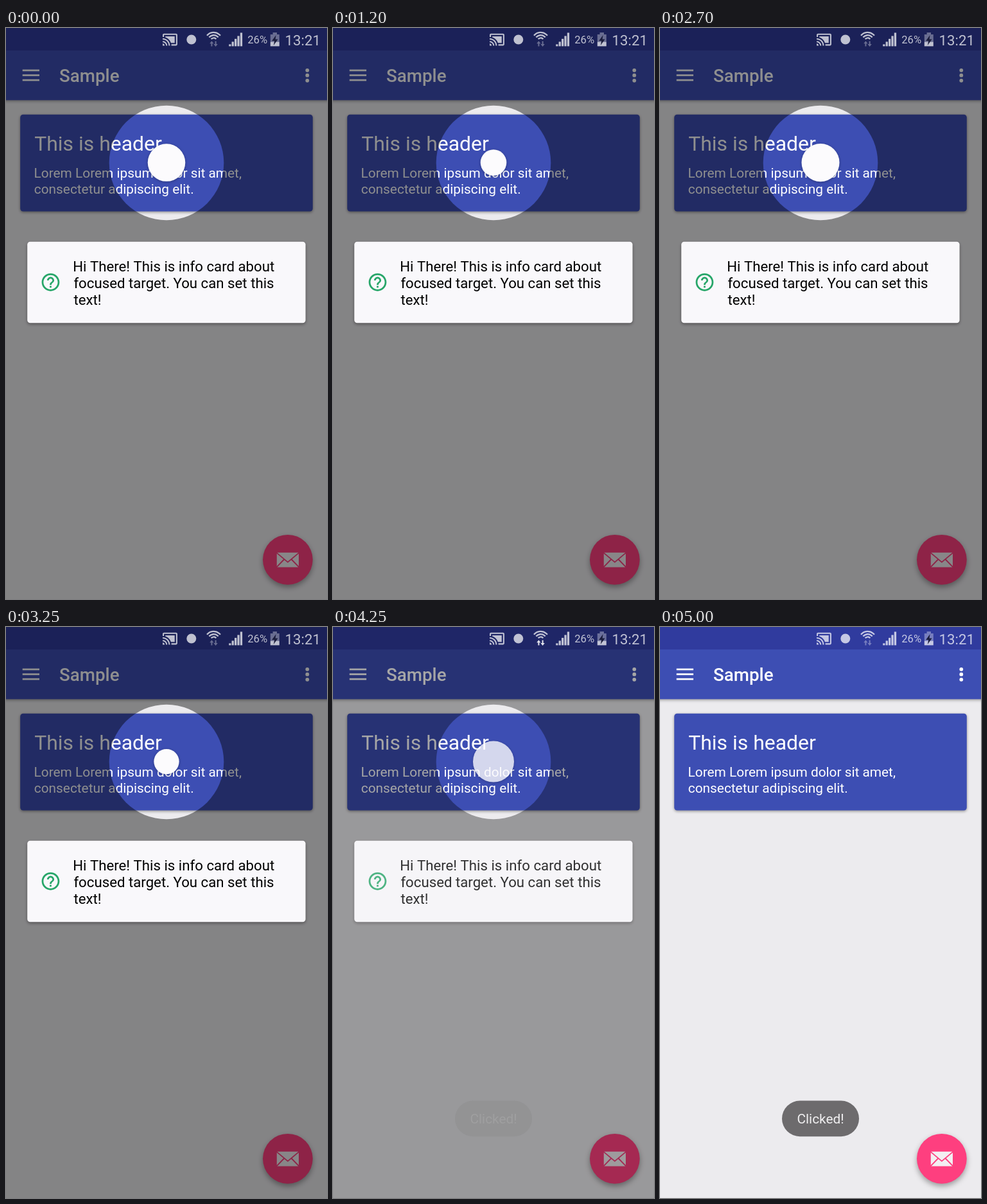
Animation, 500 px wide and 889 px high, one loop 5050 ms. Source, as an HTML page with a canvas:

```html
<!DOCTYPE html>
<html lang="en">
<head>
<meta charset="utf-8">
<title>Spotlight intro</title>
<style>
  html, body { margin: 0; width: 100%; height: 100%; overflow: hidden; background: #ecebee; }
  canvas { display: block; width: 500px; height: 889px; }
</style>
</head>
<body>
<canvas id="stage" width="500" height="889"></canvas>
<script>
const W = 500, H = 889, LOOP = 5050, STEP = 50, DP = 500 / 360;
const page = document.getElementById('stage').getContext('2d');
const layer = document.createElement('canvas');
layer.width = W;
layer.height = H;
const intro = layer.getContext('2d');

const ICON = 'rgba(255,255,255,.72)';
const DIM = 'rgba(255,255,255,.34)';
const BLUE = '#3d4eb3';
const PINK = '#fe3f7f';

const castIcon = new Path2D('M1 18v3h3c0-1.66-1.34-3-3-3zm0-4v2c2.76 0 5 2.24 5 5h2c0-3.87-3.13-7-7-7zm18-7H5v1.63c3.96 1.28 7.09 4.41 8.37 8.37H19V7zM1 10v2c4.97 0 9 4.03 9 9h2c0-6.08-4.93-11-11-11zm20-7H3c-1.1 0-2 .9-2 2v3h2V5h18v14h-7v2h7c1.1 0 2-.9 2-2V5c0-1.1-.9-2-2-2z');
const helpIcon = new Path2D('M11 18h2v-2h-2v2zm1-16C6.48 2 2 6.48 2 12s4.48 10 10 10 10-4.48 10-10S17.52 2 12 2zm0 18c-4.41 0-8-3.59-8-8s3.59-8 8-8 8 3.59 8 8-3.59 8-8 8zm0-14c-2.21 0-4 1.79-4 4h2c0-1.1.9-2 2-2s2 .9 2 2c0 2-3 1.75-3 5h2c0-2.25 3-2.5 3-5 0-2.21-1.79-4-4-4z');

// Pulse phase in degrees over time
const pulse = [[0, -55], [1200, 146], [2000, 299], [2700, 412], [3800, 625], [4250, 720], [5050, 864]];

const clamp = v => Math.min(1, Math.max(0, v));

function phaseAt(t) {
  const i = Math.max(1, pulse.findIndex(p => p[0] >= t));
  const [t0, a] = pulse[i - 1], [t1, b] = pulse[i];
  return a + (b - a) * (t - t0) / (t1 - t0);
}

function rect(c, x, y, w, h, fill) {
  c.fillStyle = fill;
  c.fillRect(x, y, w, h);
}

function rounded(c, x, y, w, h, r, fill) {
  c.beginPath();
  c.roundRect(x, y, w, h, r);
  c.fillStyle = fill;
  c.fill();
}

function disc(c, x, y, r, fill) {
  c.beginPath();
  c.arc(x, y, r, 0, Math.PI * 2);
  c.fillStyle = fill;
  c.fill();
}

function poly(c, points, fill) {
  c.beginPath();
  points.forEach(([x, y]) => c.lineTo(x, y));
  c.closePath();
  c.fillStyle = fill;
  c.fill();
}

function text(c, str, x, y, sp, fill, weight = 400) {
  c.font = `${weight} ${sp * DP}px Roboto, sans-serif`;
  c.fillStyle = fill;
  c.fillText(str, x, y);
}

function icon(c, path, x, y, scale, fill) {
  c.save();
  c.translate(x, y);
  c.scale(scale, scale);
  c.fillStyle = fill;
  c.fill(path);
  c.restore();
}

function shadowed(c, dy, blur, alpha, draw) {
  c.save();
  c.shadowColor = `rgba(0,0,0,${alpha})`;
  c.shadowBlur = blur;
  c.shadowOffsetY = dy;
  draw();
  c.restore();
}

function drawApp(c) {
  rect(c, 0, 0, W, H, '#ecebee');
  shadowed(c, 2, 5, .4, () => rect(c, -10, 30, W + 20, 82.3, BLUE));
  rect(c, 0, 0, W, 35, '#303b9e');

  for (const y of [64.6, 72.2, 79.8]) rect(c, 25.7, y, 26.3, 2.7, '#fff');
  for (const y of [65.8, 73.7, 81.8]) disc(c, 469.3, y, 2.9, '#fff');
  text(c, 'Sample', 83, 84, 20, '#fff', 500);

  shadowed(c, 1.5, 4, .4, () => rounded(c, 22.2, 134.8, 455.6, 150.8, 4.5, BLUE));
  text(c, 'This is header', 44.2, 191, 23, '#fff');
  text(c, 'Lorem Lorem ipsum dolor sit amet,', 43.6, 233.2, 15, '#fff');
  text(c, 'consectetur adipiscing elit.', 43.8, 257.8, 15, '#fff');

  drawMailButton(c);
}

function drawMailButton(c) {
  shadowed(c, 4, 8, .35, () => disc(c, 438.9, 827.8, 38.9, PINK));
  rounded(c, 421.8, 816.8, 34.2, 22.8, 1, '#f3eff2');
  c.strokeStyle = PINK;
  c.lineWidth = 1.8;
  c.beginPath();
  c.moveTo(421, 816.6);
  c.lineTo(438.9, 831.6);
  c.lineTo(456.8, 816.6);
  c.moveTo(421, 839.8);
  c.lineTo(433, 827.5);
  c.moveTo(456.8, 839.8);
  c.lineTo(444.8, 827.5);
  c.stroke();
}

function drawIntro(c, t) {
  c.clearRect(0, 0, W, H);
  rect(c, 0, 0, W, H, 'rgba(0,0,0,.44)');
  c.globalCompositeOperation = 'destination-out';
  disc(c, 250, 210, 89.3, '#000');
  c.globalCompositeOperation = 'source-over';

  const radius = 25.6 + 6.4 * Math.cos(phaseAt(t) * Math.PI / 180);
  shadowed(c, 1, 4, .3, () => disc(c, 250, 209.6, radius, '#fcfbfd'));

  shadowed(c, 2, 5, .4, () => rounded(c, 33.2, 332.8, 433.4, 126.4, 4.5, '#f9f8fb'));
  icon(c, helpIcon, 52.8, 379.2, DP, '#27a669');
  ['Hi There! This is info card about', 'focused target. You can set this', 'text!']
    .forEach((line, i) => text(c, line, i ? 105.4 : 104.2, 378.8 + 26 * i, 16, '#000'));
}

function drawStatus(c, t) {
  icon(c, castIcon, 243, 5.6, 1.04, ICON);
  disc(c, 288.8, 18, 7.5, ICON);

  c.strokeStyle = ICON;
  c.lineWidth = 2.3;
  for (const r of [5, 9.3, 13.6]) {
    c.beginPath();
    c.arc(323.5, 20.5, r, -Math.PI * .78, -Math.PI * .22);
    c.stroke();
  }
  const arrows = t >= 3700 && t < 4400 ? 'rgba(255,255,255,.88)' : DIM;
  poly(c, [[317.2, 24.2], [320.4, 20.2], [323.6, 24.2], [321.4, 24.2], [321.4, 28.6], [319.4, 28.6], [319.4, 24.2]], arrows);
  poly(c, [[323.4, 25], [325.6, 25], [325.6, 20.6], [327.6, 20.6], [327.6, 25], [329.8, 25], [326.6, 29]], arrows);

  [3, 7, 11.5, 16, 21].forEach((h, i) => rect(c, 347.2 + i * 4.4, 28.4 - h, 3.3, h, ICON));

  text(c, '26%', 376.2, 24.2, 12, ICON);

  rect(c, 415.6, 7, 6.4, 3, DIM);
  rect(c, 411.8, 10, 14, 11.6, DIM);
  rect(c, 411.8, 21.6, 14, 6.8, ICON);
  poly(c, [[420.6, 11], [414.2, 20], [418.2, 20], [416.8, 27], [423.6, 17.6], [419.6, 17.6]], '#1b1d3c');

  text(c, '13:21', 434.6, 26.6, 16, ICON);
}

function drawToast(c, alpha) {
  if (!alpha) return;
  c.save();
  c.globalAlpha = alpha;
  rounded(c, 190, 737.6, 120, 55.6, 27.8, '#6d6b6d');
  c.textAlign = 'center';
  text(c, 'Clicked!', 250, 773, 15, '#f1f0f1');
  c.restore();
}

function render(t) {
  drawApp(page);
  const fade = .5 + .5 * Math.cos(Math.PI * clamp((t - 4040) / 700));
  if (fade > 0) {
    drawIntro(intro, t);
    page.globalAlpha = fade;
    page.drawImage(layer, 0, 0);
    page.globalAlpha = 1;
  }
  drawStatus(page, t);
  drawToast(page, 1 - (1 - clamp((t - 4222) / 400)) ** 2);
}

function tick() {
  const t = performance.now() % LOOP;
  render(Math.floor(t / STEP) * STEP);
  requestAnimationFrame(tick);
}
tick();
</script>
</body>
</html>
```
